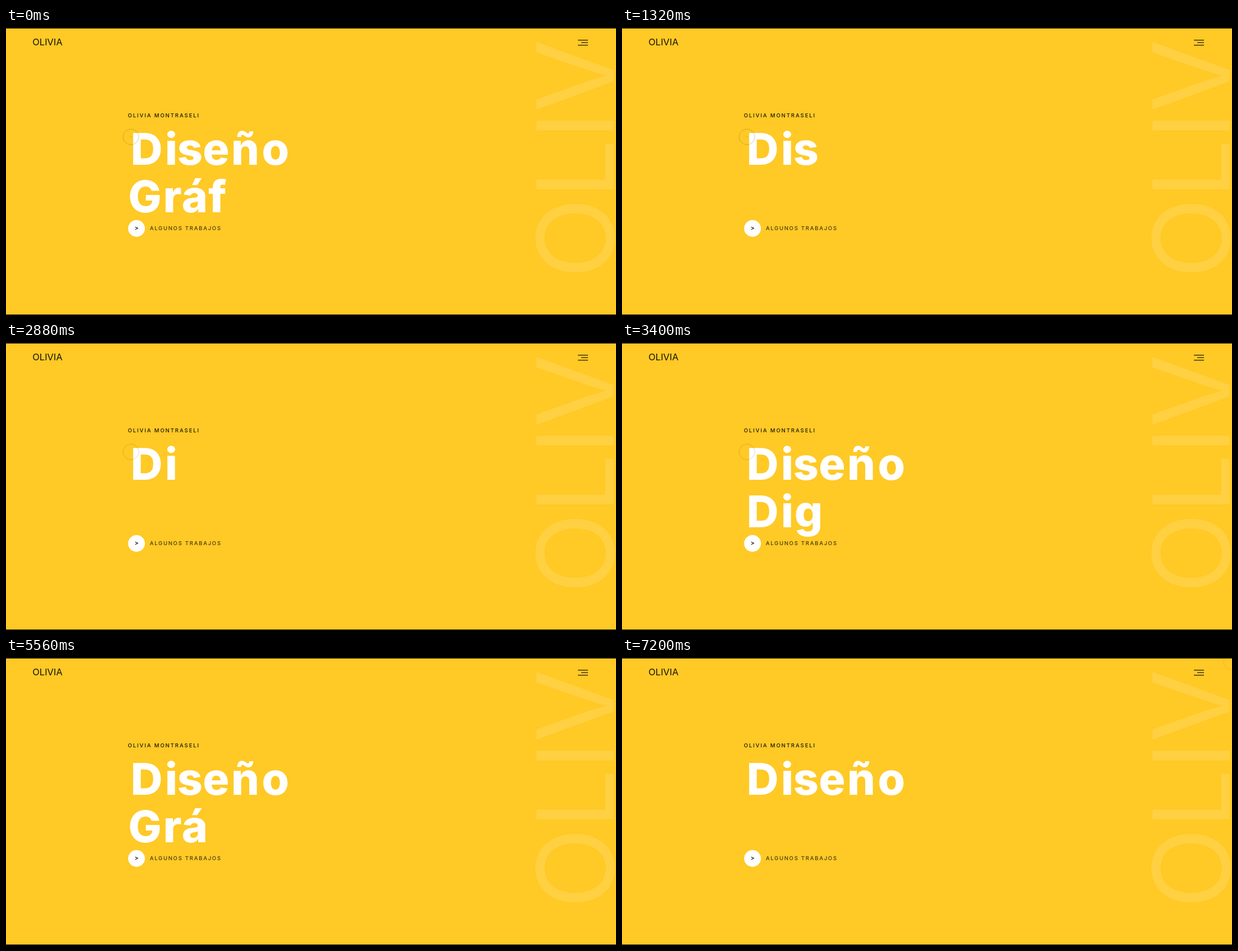
Recreate the animation shown at these times as an HTML page. Size 1089 px wide and 514 px high, loop 7240 ms.

```html
<!DOCTYPE html>
<html lang="es">
<head>
<meta charset="utf-8">
<title>Diseño</title>
<style>
  html, body { margin: 0; width: 100%; height: 100%; overflow: hidden; background: #ffc926; }
  svg { display: block; width: 100vw; height: 100vh; }
  text { font-family: Inter, Roboto, sans-serif; }
  .label { font-size: 9.6px; font-weight: 500; }
  .head { font-size: 79px; font-weight: 800; fill: #fff; text-anchor: middle; }
</style>
</head>
<body>
<svg viewBox="0 0 1089 514">
  <rect width="1089" height="514" fill="#ffc926"/>
  <text transform="translate(1085 449) rotate(-90)" font-size="190" letter-spacing="-2" fill="#ffd041">OLIV</text>
  <path d="M0 .5H1089M0 513.5H1089" stroke="#1c1704"/>
  <text x="47.2" y="31" font-size="16.5" fill="#15130a">OLIVIA</text>
  <path d="M1021 21.7H1039M1027 26.2H1039M1021 30.7H1039" stroke="#40350f" stroke-width="1.5"/>
  <text class="label" x="217.5" y="160.3" letter-spacing="1.87" fill="#1d1804">OLIVIA MONTRASELI</text>
  <text id="top" class="head" y="245"></text>
  <text id="low" class="head" y="330"></text>
  <circle cx="233" cy="359" r="15" fill="#fff"/>
  <path d="M230.6 356.2L235.2 358.6L230.6 361" fill="none" stroke="#222" stroke-width="1.2"/>
  <text class="label" x="256.7" y="362.3" letter-spacing="1.69" fill="#463a0c">ALGUNOS TRABAJOS</text>
  <g id="mouse">
    <circle r="14" fill="none" stroke="#8a6a10" stroke-width=".8"/>
    <circle id="dot" r="1" fill="#8a6a10" opacity=".6"/>
  </g>
</svg>
<script>
const LOOP = 7240;
const FIRST = "Diseño";
const $ = id => document.getElementById(id);
const top1 = $("top"), low = $("low"), mouse = $("mouse"), dot = $("dot");

// Centre of each letter
top1.setAttribute("x", "251 295 328.5 375 427 481");
const WORDS = {
  "Gráfico": "248 297 337 377.5 407 443 493",
  "Web": "262 332 384.5",
  "Digital": "251 295 333 376 405 445 483"
};

// Each phrase: typing start and step, erasing start and step (ms)
const PHRASES = [
  { word: "Gráfico", type: -510, typeStep: 50, erase: 985, eraseStep: 31 },
  { word: "Web", type: 1445, typeStep: 47, erase: 2710, eraseStep: 22 },
  { word: "Digital", type: 2930, typeStep: 50, erase: 4438, eraseStep: 35 },
  { word: "Gráfico", type: 5080, typeStep: 50, erase: 6590, eraseStep: 24 },
  { word: "Web", type: 6930, typeStep: 50, erase: LOOP, eraseStep: 30 }
];

const clamp = (v, a, b) => Math.min(b, Math.max(a, v));
const ramp = (t, a, b) => clamp((t - a) / (b - a), 0, 1);
const count = (t, start, step, max) => clamp(Math.floor((t - start) / step) + 1, 0, max);

function setText(el, s) {
  if (el.textContent !== s) el.textContent = s;
}

function drawHeadline(t) {
  const p = PHRASES.filter(q => q.type <= t).pop();
  const full = FIRST.length + 1 + p.word.length;
  const shown = count(t, p.type, p.typeStep, full) - count(t, p.erase, p.eraseStep, full);
  low.setAttribute("x", WORDS[p.word]);
  setText(top1, FIRST.slice(0, shown));
  setText(low, p.word.slice(0, Math.max(0, shown - FIRST.length - 1)));
}

function drawMouse(t) {
  const k = t < 4420 ? 0 : 1 - Math.exp(-(t - 4420) / 180);
  const rest = 0.42 - 0.1 * ramp(t, 1680, 1760);
  const leave = 1 - 0.4 * ramp(t, 4420, 4560);
  const fade = 1 - ramp(t, 4640, 5000);
  const back = 0.22 * ramp(t, 5960, 6320);
  mouse.setAttribute("transform", `translate(${223 + 865 * k} ${195 - 188 * k})`);
  mouse.setAttribute("opacity", rest * leave * fade + back);
  dot.setAttribute("visibility", t < 1720 ? "visible" : "hidden");
}

function draw(t) {
  drawHeadline(t);
  drawMouse(t);
}

const begin = performance.now();
function tick() {
  draw((performance.now() - begin) % LOOP);
  requestAnimationFrame(tick);
}
tick();
</script>
</body>
</html>
```
